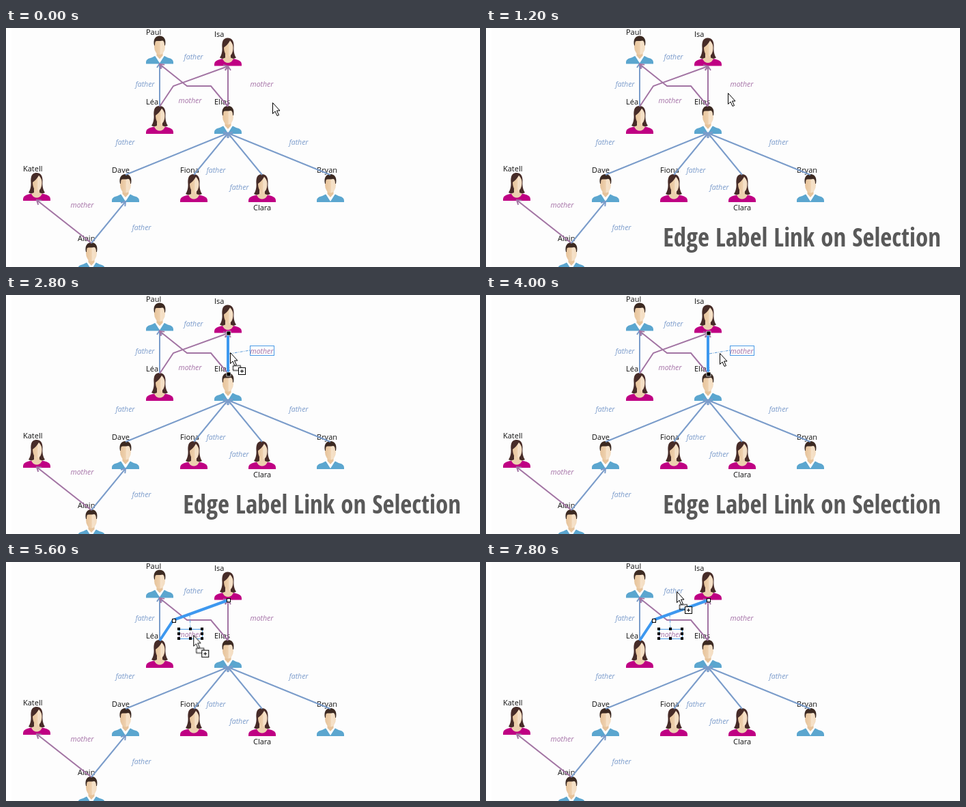
An HTML page for the animation above (8 s loop, 694 by 350 pixels).

```html
<!DOCTYPE html>
<html lang="en">
<head>
<meta charset="utf-8">
<title>Family graph</title>
<style>
  html, body { margin: 0; width: 100%; height: 100%; overflow: hidden; background: #fdfdfd; }
  svg { display: block; width: 100%; height: 100%; }

  .names { font: 11px "Open Sans", "Noto Sans", sans-serif; fill: #111; }
  .roles { font: italic 10.5px "Open Sans", "Noto Sans", sans-serif; fill: #7a9bcb; }
  .roles .m { fill: #a572a7; }
  .edges { fill: none; stroke-width: 2; stroke: #7a9cca; }
  .edges path { marker-end: url(#tipF); }
  .edges .m { stroke: #a274a3; marker-end: url(#tipM); }
  .tip { fill: none; stroke-width: 2; }

  .pick { fill: none; stroke: #3d98ef; stroke-width: 4; }
  .frame { fill: none; stroke: #4b9be6; }
  .link { fill: none; stroke: #5b9bd8; stroke-dasharray: 4 1.5 1 1.5; }
  .grip { fill: #000; stroke: #fff; stroke-width: .7; }
  .node { fill: #fff; stroke: #000; }

  .title {
    font: 700 36.9px "Open Sans Condensed", "Open Sans", "Roboto Condensed", sans-serif;
    font-stretch: 75%; fill: #595959; text-anchor: middle;
  }

  .title, .first, .second, .cursor, .copy { animation: 8s -10ms infinite; }
  .title { animation-name: title; }
  .first { animation-name: first; }
  .second { animation-name: second; }
  .cursor { animation-name: roam; }
  .copy { animation-name: copy; }
  .first, .second, .copy { animation-timing-function: step-end; }

  /* The picture advances in 200 ms ticks: 2.5% each */
  @keyframes title {
    0% { opacity: 0; animation-timing-function: steps(6); }
    15%, 57.5% { opacity: 1; animation-timing-function: steps(5); }
    70%, 100% { opacity: 0; }
  }
  @keyframes first {
    0% { opacity: 0; }
    30% { opacity: 1; }
    67.5%, 100% { opacity: 0; }
  }
  @keyframes second {
    0% { opacity: 0; }
    67.5%, 100% { opacity: 1; }
  }
  @keyframes copy {
    0% { opacity: 0; }
    20% { opacity: 1; }
    40% { opacity: 0; }
    62.5%, 100% { opacity: 1; }
  }
  @keyframes roam {
    0% { transform: translate(391px, 110px); animation-timing-function: steps(6); }
    15% { transform: translate(355px, 96px); animation-timing-function: step-end; }
    17.5% { transform: translate(340px, 105px); animation-timing-function: step-end; }
    20% { transform: translate(324px, 82px); animation-timing-function: step-end; }
    25% { transform: translate(328px, 73px); animation-timing-function: step-end; }
    30% { transform: translate(328px, 98px); animation-timing-function: steps(2); }
    35% { transform: translate(329px, 85px); animation-timing-function: steps(3); }
    42.5% { transform: translate(361px, 82px); animation-timing-function: step-end; }
    45% { transform: translate(344px, 85px); animation-timing-function: step-end; }
    50% { transform: translate(343px, 86px); animation-timing-function: steps(5); }
    62.5%, 67.5% { transform: translate(275px, 111px); animation-timing-function: steps(4); }
    77.5% { transform: translate(276px, 98px); animation-timing-function: steps(2); }
    82.5% { transform: translate(274px, 84px); animation-timing-function: steps(2); }
    87.5% { transform: translate(282px, 72px); animation-timing-function: steps(2); }
    92.5% { transform: translate(309px, 91px); animation-timing-function: step-end; }
    95% { transform: translate(306px, 64px); animation-timing-function: step-end; }
    97.5%, 100% { transform: translate(280px, 44px); }
  }
</style>
</head>
<body>
<svg viewBox="0 0 694 350">
  <defs>
    <linearGradient id="skin">
      <stop offset="0" stop-color="#e6c39b"/>
      <stop offset=".5" stop-color="#eed0ad"/>
      <stop offset=".6" stop-color="#f6e2ca"/>
      <stop offset="1" stop-color="#f3dcc0"/>
    </linearGradient>
    <marker id="tipF" class="tip" markerUnits="userSpaceOnUse" markerWidth="10" markerHeight="12" refX="8" refY="6" orient="auto">
      <path d="M2 2 8 6 2 10" stroke="#7a9cca"/>
    </marker>
    <marker id="tipM" class="tip" markerUnits="userSpaceOnUse" markerWidth="10" markerHeight="12" refX="8" refY="6" orient="auto">
      <path d="M2 2 8 6 2 10" stroke="#a274a3"/>
    </marker>
    <g id="man">
      <path d="M0 40V38C0 34 3 32 8 31L13 28.500H27L32 31C37 32 40 34 40 38V40Z" fill="#5ba6cf"/>
      <path d="M13 28 20 39 27 28Z" fill="#fff"/>
      <path d="M15.500 21H24.500V28L20 33 15.500 28Z" fill="#e6c39b"/>
      <ellipse cx="20" cy="14.500" rx="8" ry="12" fill="url(#skin)"/>
      <path d="M12 13C10 4 14-1 20-1S30 4 28 13H27C27 9 26 6 24 6 20 7 16 6 14 7 13 9 13 11 13 13Z" fill="#3c2a22"/>
    </g>
    <g id="woman">
      <path d="M19-1C12-.500 11 6 11.500 13 12 20 10 25 8 28 13 31 27 31 32 28 30 25 28 20 28.500 13 29 5 27-1 19-1Z" fill="#472c28"/>
      <path d="M0 40V38C0 33 4 31 13 29.500H27C36 31 40 33 40 38V40Z" fill="#bf0083"/>
      <path d="M16 21H24V28L28 29.500C26 34 23 35.500 20 35.500S14 34 12 29.500L16 28Z" fill="#ecd0ae"/>
      <path d="M23 3C20 8 17 11 14 13 14 20 17 25.500 21 25.500S27.500 20 27.500 13C27.500 8 25 5 23 3Z" fill="url(#skin)"/>
    </g>
  </defs>

  <rect width="8" height="350" fill="#fff"/>

  <use href="#man" x="205" y="12.5"/>
  <use href="#woman" x="305" y="15.5"/>
  <use href="#woman" x="205" y="115"/>
  <use href="#man" x="305" y="115"/>
  <use href="#woman" x="25" y="213"/>
  <use href="#man" x="155" y="215"/>
  <use href="#woman" x="255" y="215"/>
  <use href="#woman" x="355" y="215"/>
  <use href="#man" x="455" y="215"/>
  <use href="#man" x="105" y="315"/>

  <g class="names">
    <text x="205" y="10">Paul</text>
    <text x="305" y="13">Isa</text>
    <text x="205" y="112">Léa</text>
    <text x="305" y="112">Elias</text>
    <text x="25" y="210">Katell</text>
    <text x="155" y="212">Dave</text>
    <text x="255" y="212">Fiona</text>
    <text x="455" y="212">Bryan</text>
    <text x="362" y="267">Clara</text>
    <text x="105" y="312">Alain</text>
  </g>

  <g class="edges">
    <path d="M225 115V52"/>
    <path class="m" d="M325 115 300 85H265L225 53"/>
    <path class="m" d="M225 115 245 85 325 56"/>
    <path class="m" d="M325 115V56"/>
    <path d="M175 215 325 154"/>
    <path d="M275 215 325 154"/>
    <path d="M375 215 325 154"/>
    <path d="M475 215 325 154"/>
    <path class="m" d="M125 315 45 252"/>
    <path d="M125 315 175 254"/>
  </g>

  <g class="first">
    <path class="pick" d="M325 115V56"/>
    <path class="link" d="M327 86 357 81"/>
    <rect class="frame" x="357.500" y="74.500" width="35" height="14"/>
    <rect class="grip" x="323" y="53" width="6" height="6"/>
    <rect class="grip" x="323" y="113" width="6" height="6"/>
  </g>
  <g class="second">
    <path class="pick" d="M225 115 245 85 325 56"/>
    <path class="link" d="M269 77 270 98"/>
    <rect class="frame" x="253.500" y="98.500" width="34" height="14"/>
    <rect class="node" x="243.500" y="83.500" width="5" height="5"/>
    <rect class="node" x="323.500" y="53.500" width="5" height="5"/>
  </g>

  <g class="roles">
    <text x="260.500" y="46">father</text>
    <text x="189.500" y="86">father</text>
    <text class="m" x="252.500" y="110">mother</text>
    <text class="m" x="357.500" y="86">mother</text>
    <text x="160.500" y="171">father</text>
    <text x="414.500" y="171">father</text>
    <text x="293.500" y="212">father</text>
    <text x="327.500" y="237">father</text>
    <text class="m" x="94.500" y="263">mother</text>
    <text x="184.500" y="296">father</text>
  </g>

  <path class="second" fill="#000" d="M251 96h4v4h-4zM268 96h4v4h-4zM285 96h4v4h-4zM251 103h4v4h-4zM285 103h4v4h-4zM251 110h4v4h-4zM268 110h4v4h-4zM285 110h4v4h-4z"/>

  <text class="title" x="462.500" y="320">Edge Label Link on Selection</text>

  <g class="cursor">
    <g class="copy">
      <rect x="3.500" y="18.500" width="11" height="7" fill="#fff" fill-opacity=".5" stroke="#000" stroke-width="2" stroke-dasharray="1 1"/>
      <rect x="11.500" y="21.500" width="10" height="10" fill="#fff" stroke="#000"/>
      <path d="M14 26.500H19M16.500 24V29" stroke="#000"/>
    </g>
    <path d="M-.5 -.5V15.500L3 12 6 18.500 8.500 17.500 5.500 11H10Z" fill="#fff" stroke="#000"/>
  </g>
</svg>
</body>
</html>
```
